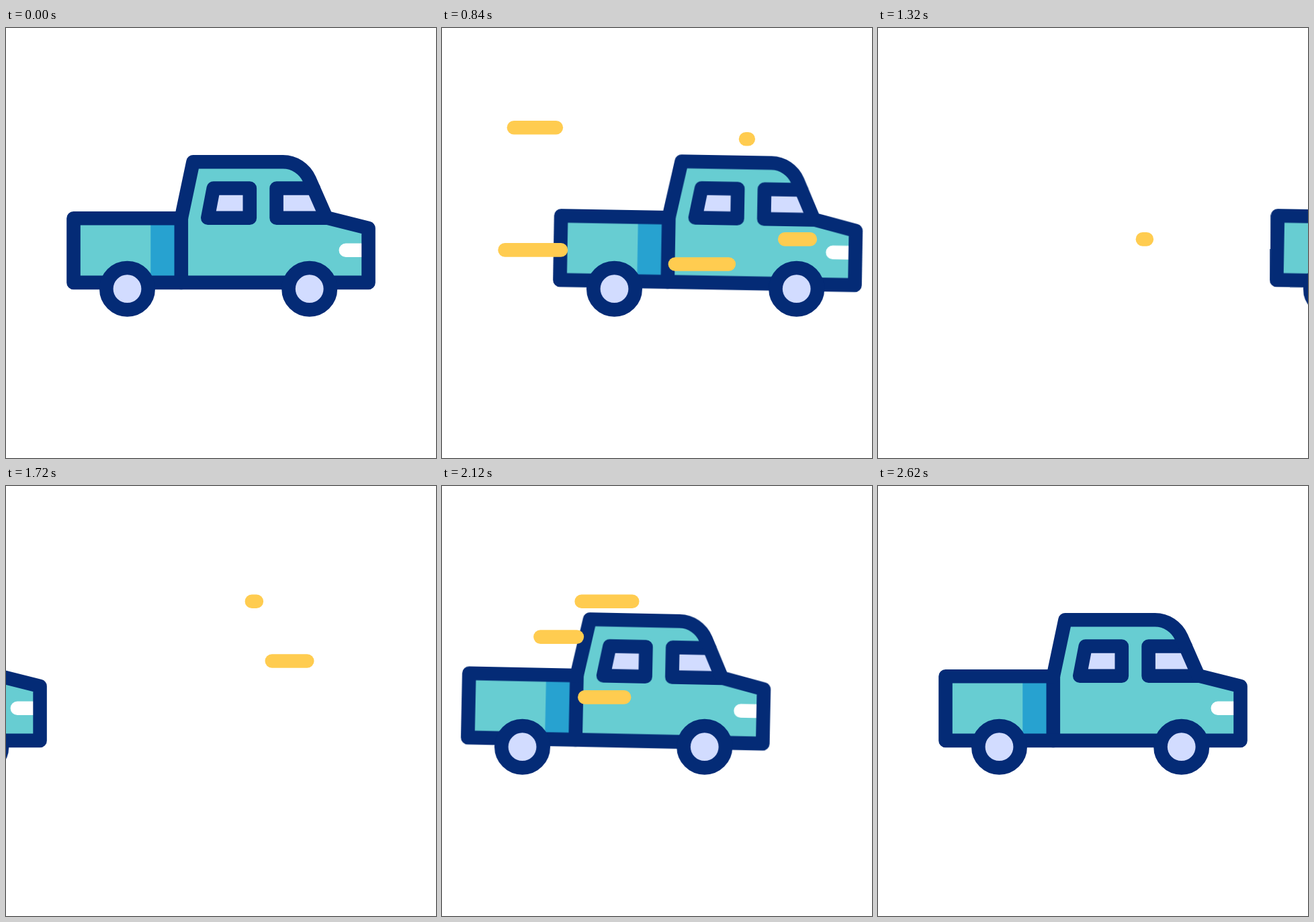
An HTML page for the animation above (2800 ms loop, 640x640 px).

```html
<!DOCTYPE html>
<html lang="en">
<head>
<meta charset="utf-8">
<title>Pickup truck</title>
<style>
  @property --head { syntax: "<length>"; inherits: false; initial-value: 0px; }
  @property --tail { syntax: "<length>"; inherits: false; initial-value: 0px; }

  html, body { margin: 0; width: 100%; height: 100%; overflow: hidden; background: #fff; }
  svg { display: block; width: 100%; height: 100%; }

  .drive, .tilt, .wind path {
    animation-duration: 2800ms;
    animation-iteration-count: infinite;
    animation-timing-function: cubic-bezier(.333, 0, .667, 1);
  }
  .drive { animation-name: drive; }
  .tilt { animation-name: tilt; transform-origin: 320px 320px; }

  .outline { fill: none; stroke: #042b76; stroke-width: 20.6; stroke-linejoin: round; stroke-linecap: round; }
  .paint { fill: #67cdd2; }
  .shade { fill: #27a2d0; }
  .glass { fill: #d2dcff; }
  .lamp { fill: #fff; }

  /* Each streak is a dash whose tail follows its head 200 ms later */
  .wind path {
    fill: none;
    stroke: #ffcc50;
    stroke-width: 20.6;
    stroke-linecap: round;
    stroke-dasharray: calc(var(--head) - var(--tail)) 300px;
    stroke-dashoffset: calc(var(--tail) * -1);
    opacity: 0;
    animation-name: head, tail, show;
    animation-timing-function: cubic-bezier(.333, 0, .667, 1), cubic-bezier(.333, 0, .667, 1), step-end;
    animation-delay: var(--at);
  }

  @keyframes drive {
    0%, 7.143% { transform: translateX(0); }
    21.429% { transform: translateX(-25px); }
    54% { transform: translateX(560px); animation-timing-function: step-end; }
    55.714% { transform: translateX(-560px); }
    82.143% { transform: translateX(25.3px); }
    92.857%, 100% { transform: translateX(0); }
  }
  @keyframes tilt {
    0%, 7.143% { transform: rotate(0deg); }
    21.429% { transform: rotate(-3deg); }
    30% { transform: rotate(1deg); }
    54% { transform: rotate(1deg); animation-timing-function: step-end; }
    55.714%, 67.857% { transform: rotate(0deg); }
    82.143% { transform: rotate(2.05deg); }
    92.857%, 100% { transform: rotate(0deg); }
  }
  @keyframes head {
    0% { --head: 0px; }
    17.857%, 100% { --head: 100px; }
  }
  @keyframes tail {
    0%, 7.143% { --tail: 0px; }
    25%, 100% { --tail: 100px; }
  }
  @keyframes show {
    0% { opacity: 0; }
    .3% { opacity: 1; }
    25%, 100% { opacity: 0; }
  }
</style>
</head>
<body>
<svg viewBox="0 0 640 640">
  <g class="drive">
    <g class="tilt">
      <path class="paint" d="M100.5 283.2H260.8L278.5 199.3H412A43 43 0 0 1 451.6 225.2L476.8 282.3 539.5 298V378.9H100.5Z"/>
      <path class="shade" d="M215.3 283.2H260.8V378.9H215.3Z"/>
      <path class="lamp" d="M532 320.4H505.8a10.3 10.3 0 0 0 0 20.6H532Z"/>
      <path class="glass" d="M308.8 238.5H362.8V282.8H300.3ZM402.6 238.5H457.5L477 282.8H402.6Z"/>
      <g class="outline">
        <path d="M308.8 238.5H362.8V282.8H300.3Z"/>
        <path d="M457.5 238.5H402.6V282.8H477"/>
        <path d="M260.8 283.2V378.9"/>
        <path d="M100.5 283.2H260.8L278.5 199.3H412A43 43 0 0 1 451.6 225.2L476.8 282.3 539.5 298V378.9H100.5Z"/>
      </g>
    </g>
    <g class="outline">
      <circle class="glass" cx="180.5" cy="388.2" r="31.2"/>
      <circle class="glass" cx="451.7" cy="388.2" r="31.2"/>
    </g>
  </g>
  <g class="wind">
    <path pathLength="100" style="--at:200ms" d="M547.6 165.3h-95.5"/>
    <path pathLength="100" style="--at:360ms" d="M262.3 148.3h-156"/>
    <path pathLength="100" style="--at:480ms" d="M461.3 351.5h-141"/>
    <path pathLength="100" style="--at:540ms" d="M193.2 330.4h-153"/>
    <path pathLength="100" style="--at:680ms" d="M547.9 314.4h-154"/>
    <path pathLength="100" style="--at:1412ms" d="M459.8 260.5h-95"/>
    <path pathLength="100" style="--at:1660ms" d="M372.8 171.8h-168"/>
    <path pathLength="100" style="--at:1780ms" d="M219.5 224.6h-96"/>
    <path pathLength="100" style="--at:1900ms" d="M271.9 314.4h-144"/>
  </g>
</svg>
</body>
</html>
```
